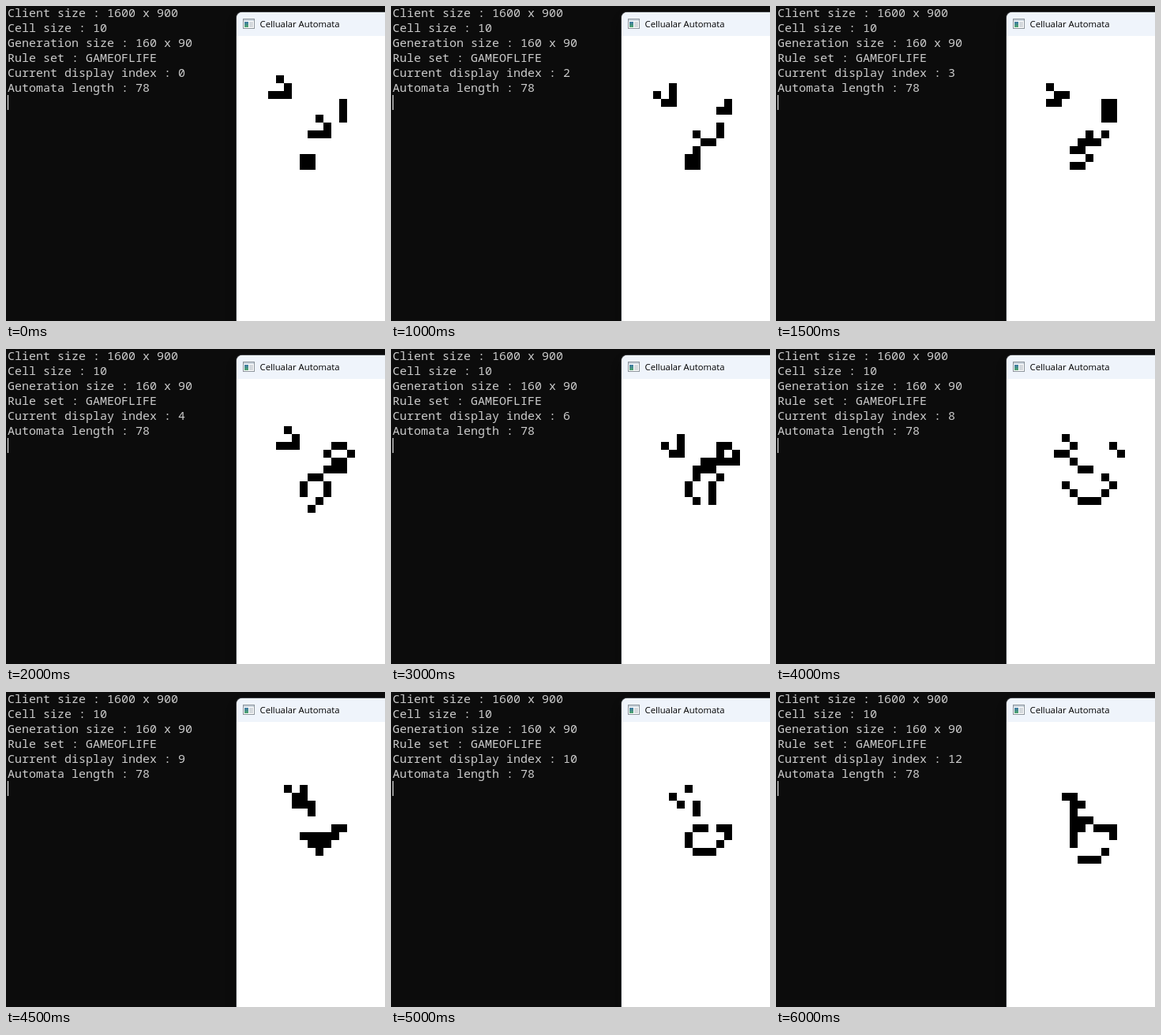
Write an HTML page with a canvas that moves like this. It is 480 px wide and 400 px high and loops after 6500 ms.

```html
<!DOCTYPE html>
<html lang="en">
<head>
<meta charset="utf-8">
<title>Cellular automaton</title>
<style>
  html, body { margin: 0; width: 100%; height: 100%; overflow: hidden; background: #0c0c0c; }
  canvas { display: block; }
</style>
</head>
<body>
<canvas id="stage" width="480" height="400"></canvas>
<script>
const ctx = document.getElementById('stage').getContext('2d');
const STEP = 500, GENERATIONS = 13;
const COLS = 160, ROWS = 90, CELL = 10;
const WIN = { x: 292, y: 8, bar: 30 };

const glider = ['.#.', '..#', '###'];
const blinker = ['#', '#', '#'];
const block = ['##', '##'];

function stamp(grid, pattern, col, row) {
  pattern.forEach((line, r) => [...line].forEach((c, k) => {
    if (c === '#') grid[(row + r) * COLS + col + k] = 1;
  }));
}

function neighbours(grid, col, row) {
  let sum = 0;
  for (let r = row - 1; r <= row + 1; r++) {
    for (let c = col - 1; c <= col + 1; c++) {
      const inside = r >= 0 && r < ROWS && c >= 0 && c < COLS;
      if (inside && (r !== row || c !== col)) sum += grid[r * COLS + c];
    }
  }
  return sum;
}

function evolve(grid) {
  return grid.map((alive, i) => {
    const n = neighbours(grid, i % COLS, Math.floor(i / COLS));
    return n === 3 || (alive && n === 2) ? 1 : 0;
  });
}

const seed = new Uint8Array(COLS * ROWS);
stamp(seed, glider, 4, 5);
stamp(seed, glider, 9, 10);
stamp(seed, blinker, 13, 8);
stamp(seed, block, 8, 15);

const history = [seed];
while (history.length < GENERATIONS) history.push(evolve(history.at(-1)));

function rect(color, x, y, w, h) {
  ctx.fillStyle = color;
  ctx.fillRect(x, y, w, h);
}

function drawConsole(index) {
  rect('#0c0c0c', 0, 0, 480, 400);
  ctx.fillStyle = '#cccccc';
  ctx.font = '500 15px "Noto Sans Mono", "DejaVu Sans Mono", monospace';
  [
    'Client size : 1600 x 900',
    'Cell size : 10',
    'Generation size : 160 x 90',
    'Rule set : GAMEOFLIFE',
    `Current display index : ${index}`,
    'Automata length : 78'
  ].forEach((line, i) => ctx.fillText(line, 2, 14 + i * 19));
  rect('#ffffff', 2, 113, 1, 19);
}

function drawIcon(x, y) {
  rect('#8d959c', x, y, 15, 13);
  rect('#c9d3dc', x + 1, y + 1, 13, 2);
  rect('#ffffff', x + 1, y + 3, 13, 9);
  const pane = ctx.createLinearGradient(0, y + 4, 0, y + 11);
  pane.addColorStop(0, '#3f78a8');
  pane.addColorStop(1, '#4fa66a');
  rect(pane, x + 2, y + 4, 5, 7);
  rect('#d5d9dd', x + 8, y + 4, 5, 7);
}

function drawWindow() {
  ctx.save();
  ctx.shadowColor = 'rgba(0, 0, 0, 0.5)';
  ctx.shadowBlur = 20;
  ctx.shadowOffsetY = 6;
  ctx.fillStyle = '#3a3c3f';
  ctx.beginPath();
  ctx.roundRect(WIN.x - 1, WIN.y - 1, 300, 500, 8);
  ctx.fill();
  ctx.restore();

  ctx.save();
  ctx.beginPath();
  ctx.roundRect(WIN.x, WIN.y, 300, 500, 7);
  ctx.clip();
  rect('#ffffff', WIN.x, WIN.y, 300, 500);
  rect('#eff4fb', WIN.x, WIN.y, 300, WIN.bar);
  ctx.restore();

  drawIcon(300, 16);
  ctx.fillStyle = '#000000';
  ctx.font = '11.3px "Open Sans", "Noto Sans", sans-serif';
  ctx.fillText('Cellualar Automata', 321.5, 27);
}

function drawCells(grid) {
  grid.forEach((alive, i) => {
    if (!alive) return;
    const x = WIN.x + (i % COLS) * CELL;
    const y = WIN.y + WIN.bar + Math.floor(i / COLS) * CELL;
    rect('#000000', x, y, CELL, CELL);
  });
}

function frame() {
  const index = Math.floor(performance.now() / STEP) % GENERATIONS;
  drawConsole(index);
  drawWindow();
  drawCells(history[index]);
  requestAnimationFrame(frame);
}
frame();
</script>
</body>
</html>
```
